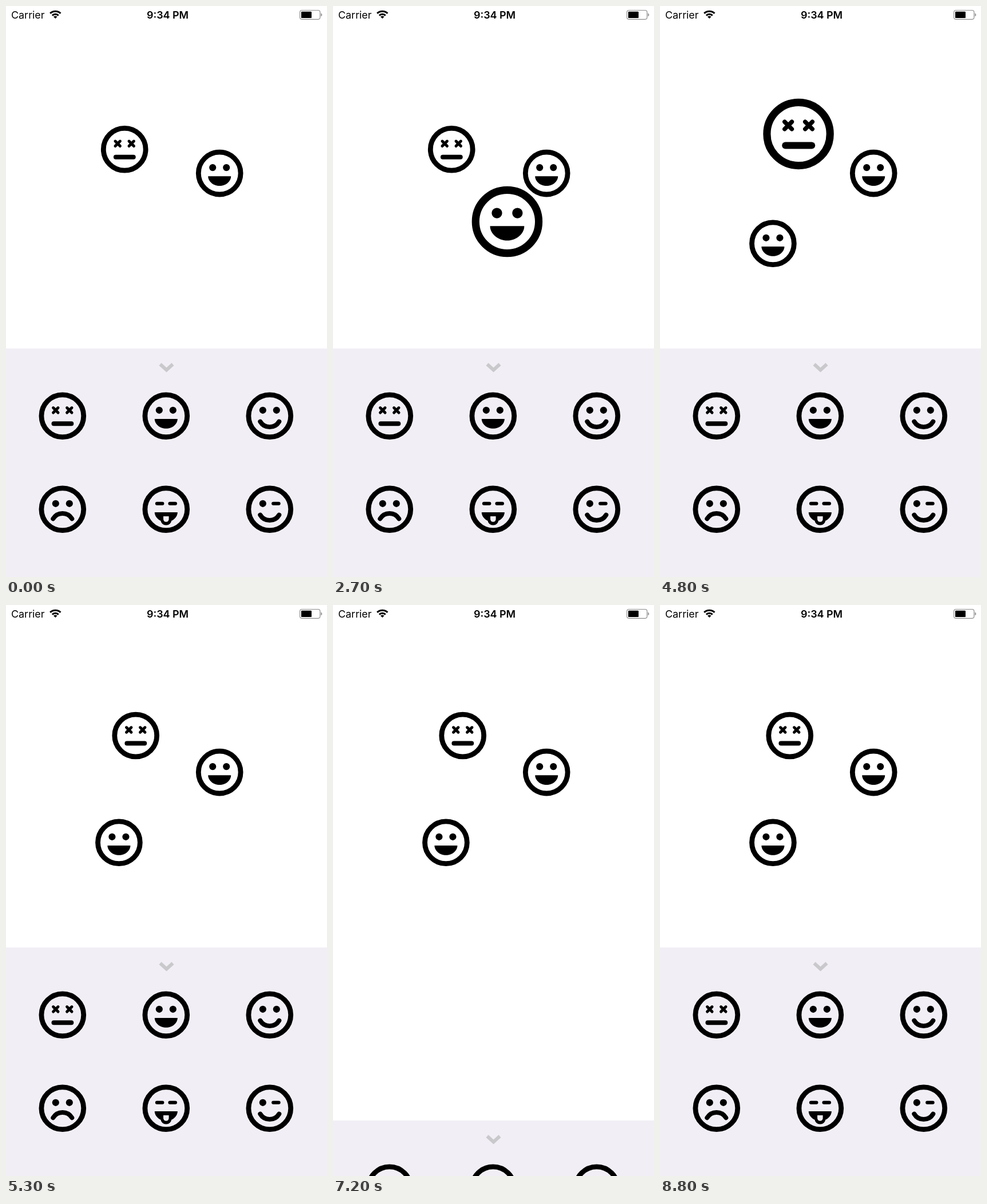
Animation, 561 px wide and 997 px high, one loop 9 s. Source, as an HTML page:

```html
<!DOCTYPE html>
<html lang="en">
<head>
<meta charset="utf-8">
<title>Sticker panel</title>
<style>
  html, body { margin: 0; width: 100%; height: 100%; overflow: hidden; background: #fff; }
  svg { display: block; width: 100vw; height: 100vh; }
  text { font: 17.9px Inter, sans-serif; }
  .bold { font-weight: 600; text-anchor: middle; }
  .line { fill: none; stroke: #000; stroke-width: 8; stroke-linecap: round; }
  .thin { stroke-width: 6; }
  .cross { stroke-width: 5; }
</style>
</head>
<body>
<svg viewBox="0 0 561 997">
  <defs>
    <circle id="ring" r="36.9" fill="none" stroke="#000" stroke-width="8.8"/>
    <circle id="eye" r="6.1" cy="-10"/>
    <path id="cross" class="line cross" d="M-4.2-14.2l8.4 8.4m0-8.4l-8.4 8.4"/>
    <path id="grin" d="M-20 5.1H20C20 14 11 22 0 22S-20 14-20 5.1Z"/>
    <path id="curve" class="line" d="M-16.5 9.8A19.2 19.2 0 0 0 16.5 9.8"/>
    <g id="eyes"><use href="#eye" x="-12"/><use href="#eye" x="12"/></g>

    <g id="dead">
      <use href="#ring"/><use href="#cross" x="-12"/><use href="#cross" x="12"/>
      <path class="line" d="M-15.3 13.4h30.8"/>
    </g>
    <g id="laugh"><use href="#ring"/><use href="#eyes"/><use href="#grin"/></g>
    <g id="smile"><use href="#ring"/><use href="#eyes"/><use href="#curve"/></g>
    <g id="sad">
      <use href="#ring"/><use href="#eyes"/>
      <use href="#curve" transform="translate(0 26.3) scale(1 -1)"/>
    </g>
    <g id="tongue">
      <use href="#ring"/><use href="#grin"/>
      <path class="line thin" d="M-16-10h9.6M6.6-10h9.6"/>
      <path d="M-9.5 12h19v6.5a9.5 9.3 0 0 1-19 0Z"/>
      <path d="M-4.8 12.2h9.6v5a4.8 4.8 0 0 1-9.6 0Z" fill="#f1eef5"/>
    </g>
    <g id="wink">
      <use href="#ring"/><use href="#eye" x="-12"/><use href="#curve"/>
      <path class="line thin" d="M6.3-10h9.6"/>
    </g>
  </defs>

  <rect width="561" height="997" fill="#fff"/>

  <text x="9" y="21.8">Carrier</text>
  <text class="bold" x="282.5" y="21.8">9:34 PM</text>
  <g transform="translate(86.3 22)">
    <path d="M0 0L-3.2-3.2A4.5 4.5 0 0 1 3.2-3.2Z"/>
    <path d="M-5.4-5.4A7.6 7.6 0 0 1 5.4-5.4M-9.1-9.1A12.9 12.9 0 0 1 9.1-9.1"
          fill="none" stroke="#000" stroke-width="3"/>
  </g>
  <rect x="513.7" y="7.5" width="35.2" height="15.8" rx="3.5" fill="none" stroke="#8c8c8c" stroke-width="1.2"/>
  <rect x="516" y="9.7" width="18" height="11.4" rx="1.2"/>
  <path d="M550.4 12.5q2 .8 2 2.9t-2 2.9Z" fill="#8c8c8c"/>

  <g id="panel">
    <rect width="561" height="400" fill="#f1eef5"/>
    <path d="M269.5 27.5l11 10 11-10" fill="none" stroke="#c9c8cb" stroke-width="6"/>
  </g>

  <use href="#laugh" x="373.2" y="292.1"/>
  <use id="moved" href="#dead"/>
  <use id="added" href="#laugh"/>
</svg>

<script>
const LOOP = 9000, STEP = 100;
const OPEN_Y = 598, CLOSED_Y = 922;
const ADD_TIME = 1500, HELD_SCALE = 1.495;
const [panel, moved, added] = ["panel", "moved", "added"].map(id => document.getElementById(id));

["dead", "laugh", "smile", "sad", "tongue", "wink"].forEach((name, i) => {
  const x = 98.8 + i % 3 * 181, y = 117.8 + Math.floor(i / 3) * 163;
  panel.insertAdjacentHTML("beforeend", `<use href="#${name}" x="${x}" y="${y}"/>`);
});

const mix = (a, b, p) => a + (b - a) * p;
const mixPoint = (a, b, p) => a.map((v, i) => mix(v, b[i], p));
const ramp = (t, start, end) => Math.min(1, Math.max(0, (t - start) / (end - start)));

// Critically damped spring from 0 to 1
function spring(t, start, end) {
  if (t <= start) return 0;
  if (t >= end) return 1;
  const w = 0.012 * (t - start);
  return 1 - (1 + w) * Math.exp(-w);
}

const movedDrag = {
  lift: 4500, drop: 5100, to: [226.7, 228],
  center: [249, 245], radius: [37, 139.5], speed: 0.0157, phase: [1.76, -0.155]
};
const addedDrag = {
  lift: 2400, drop: 3200, to: [197.4, 414.8],
  center: [250.9, 383.5], radius: [53.5, 70], speed: 0.01, phase: [0, -0.1]
};

// A face is picked up, swung around a loop and put down
function drag(face, from, t, { lift, drop, to, center, radius, speed, phase }) {
  const angle = speed * (Math.min(t, drop) - lift - 300);
  const finger = [
    center[0] + radius[0] * Math.cos(angle + phase[0]),
    center[1] + radius[1] * Math.sin(angle + phase[1])
  ];
  const release = ramp(t, drop, drop + 200);
  const grip = ramp(t, lift - 30, lift + 200) * (1 - release);
  const [x, y] = mixPoint(mixPoint(from, finger, ramp(t, lift, lift + 100)), to, release);
  face.setAttribute("transform", `translate(${x} ${y}) scale(${mix(1, HELD_SCALE, grip)})`);
}

function draw(now) {
  const t = Math.floor(now % LOOP / STEP) * STEP;
  const closed = spring(t, 6836, 7600) - spring(t, 8193, 8800);
  panel.setAttribute("transform", `translate(0 ${mix(OPEN_Y, CLOSED_Y, closed)})`);
  drag(moved, [207.2, 250.3], t, movedDrag);
  const landing = mixPoint([252, 684], [218.5, 411.8], spring(t, ADD_TIME - 80, ADD_TIME + 300));
  drag(added, landing, t, addedDrag);
  added.style.display = t < ADD_TIME ? "none" : "";
}

let start;
function frame(now) {
  start ??= now;
  draw(now - start);
  requestAnimationFrame(frame);
}
draw(0);
requestAnimationFrame(frame);
</script>
</body>
</html>
```
